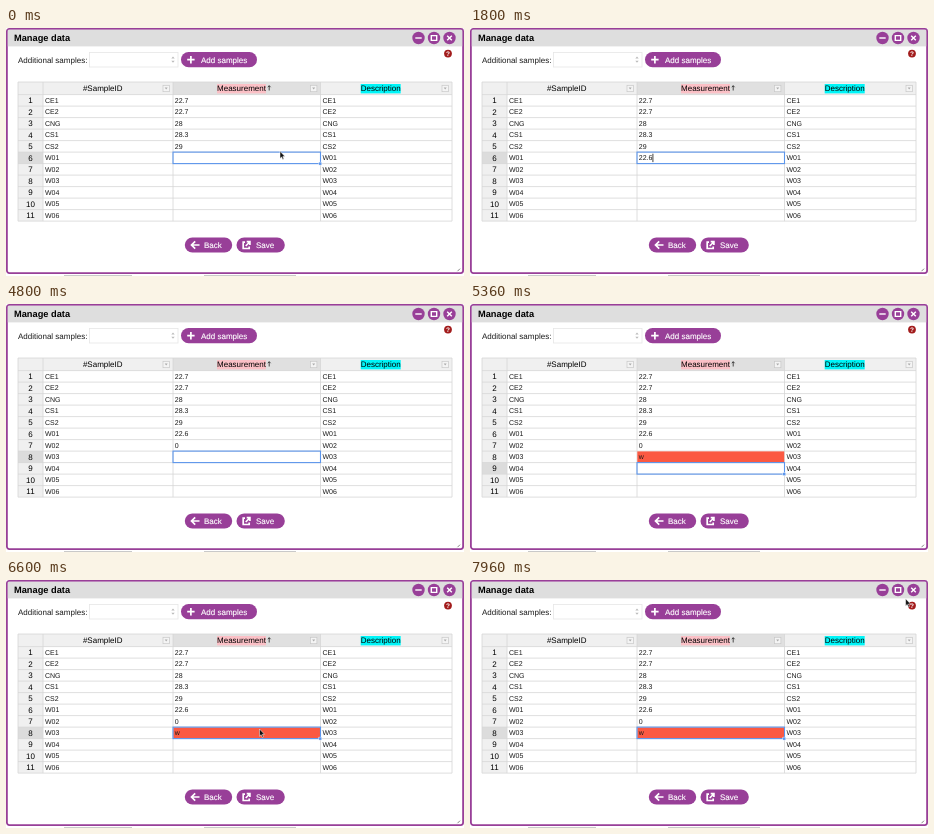
Recreate the animation shown at these times as an HTML page. Size 458x248 px, loop 8000 ms.

```html
<!DOCTYPE html>
<html lang="en">
<head>
<meta charset="utf-8">
<title>Manage data</title>
<style>
html, body { margin: 0; width: 100%; height: 100%; overflow: hidden; background: #fff; }
svg { display: block; width: 100vw; height: 100vh; font: 8px "Liberation Sans", Arial, sans-serif; text-rendering: geometricPrecision; }
</style>
</head>
<body>
<svg id="stage" viewBox="0 0 458 248"></svg>
<script>
const LOOP = 8000, BLINK = 250;
const PURPLE = '#983f98', BLUE = '#5c96ec', GRID = '#d6d6d6', HEADER = '#f0f0f0', ACTIVE = '#e0e0e0', INK = '#1a1a1a';
const COLUMNS = [12, 37, 167, 314.5, 446];
const [LEFT, NAME_X, VALUE_X, NOTE_X, RIGHT] = COLUMNS;
const HEAD_TOP = 54, FIRST_ROW = 66.6, ROW_HEIGHT = 11.5;
const SAMPLES = ['CE1', 'CE2', 'CNG', 'CS1', 'CS2', 'W01', 'W02', 'W03', 'W04', 'W05', 'W06'];
const VALUES = ['22.7', '22.7', '28', '28.3', '29'];

// keys: when each character of the text is typed; blink: when a caret cycle starts.
const EDITS = [
  { row: 6, open: 1100, close: 2030, blink: 1300, text: '22.6', keys: [1100, 1160, 1300, 1800] },
  { row: 7, open: 2660, close: 2830, blink: 2660, text: '0', keys: [2660] },
  { row: 8, open: 3300, close: 5300, blink: 3050, text: 'w', keys: [4930] }
];
const INVALID = EDITS[2], CLICK = 6265;

const POINTER_MOVES = [
  { start: 160, end: 330, from: [274, 123.3], to: [248, 131.8] },
  { start: 610, end: 665, from: [248, 131.8], to: [322, 201.5] },
  { start: 6010, end: 6240, from: [294, 224], to: [253.5, 149] },
  { start: 7150, end: 7720, from: [253.5, 149], to: [437, 6] },
  { start: 7800, end: 7950, from: [437, 6], to: [435.6, 18.7] }
];
const pointerHidden = t => t >= 700 && t < 6030;

const rowTop = row => FIRST_ROW + (row - 1) * ROW_HEIGHT;
const BOTTOM = rowTop(SAMPLES.length + 1);
const rect = (x, y, w, h, fill, extra = '') => `<rect x="${x}" y="${y}" width="${w}" height="${h}" fill="${fill}" ${extra}/>`;
const path = (d, stroke, width = 1) => `<path d="${d}" fill="none" stroke="${stroke}" stroke-width="${width}"/>`;
const text = (x, y, value, extra = '') => `<text x="${x}" y="${y}" ${extra}>${value}</text>`;
const cell = (x, row, value, extra = '') => text(x, rowTop(row) + 8.1, value, `font-size="7" fill="${INK}" ${extra}`);
const centered = 'text-anchor="middle"';

function pill(x, y, w, label, textX, icon) {
  return rect(x, y, w, 15.2, PURPLE, 'rx="7.6"') + path(icon, '#fff', 1.7) +
    text(textX, y + 10.5, label, 'fill="#fff" stroke="#fff" stroke-width=".15"');
}

function windowFrame() {
  const icons = ['M409.3 10h6.4', 'M425.3 7.6h5.4v4.8h-5.4z', 'M441.2 7.7l4.6 4.6m0-4.6l-4.6 4.6'];
  return rect(0, 0, 458, 248, '#fff') +
    path('M58 247.5H126M198 247.5H290', '#bbb', .8) +
    rect(.9, .9, 456.2, 244.2, '#fff', `rx="2.5" stroke="${PURPLE}" stroke-width="1.8"`) +
    rect(1.8, 1.8, 454.4, 16.6, '#dedede') +
    text(8, 13, 'Manage data', 'font-size="9.25" font-weight="bold"') +
    icons.map((d, i) => `<circle cx="${412.5 + i * 15.5}" cy="10" r="6.2" fill="${PURPLE}"/>` + path(d, '#fff', 1.4)).join('') +
    '<circle cx="442" cy="25.6" r="3.9" fill="#a21c1c"/>' +
    text(442, 28, '?', `font-size="6.5" font-weight="bold" fill="#fff" ${centered}`) +
    path('M451.5 243.2l2.5-2.5', '#777', .9);
}

function controls() {
  return text(12, 34.6, 'Additional samples:', `fill="${INK}"`) +
    rect(83.5, 24.5, 88.5, 14.5, '#fff', 'stroke="#e6e6e6" stroke-width=".8"') +
    '<path d="M165.3 30.6l1.7-2 1.7 2zM165.3 32.8l1.7 2 1.7-2z" fill="#bbb"/>' +
    pill(175, 24.1, 76, 'Add samples', 195, 'M181.2 31.7h7.4M184.9 28v7.4') +
    pill(178.8, 209.4, 47.4, 'Back', 198, 'M193.5 217h-8m3.7-3.6l-3.7 3.6 3.7 3.6') +
    pill(230.5, 209.4, 48.3, 'Save', 250, 'M239 214.2h-1.8v6.3h6v-2M239.7 218l4-4M240.7 213.7h3.2v3.2');
}

function tableHeader() {
  const height = FIRST_ROW - HEAD_TOP;
  const menus = [NOTE_X, VALUE_X, RIGHT].map(edge => {
    const x = edge - 6.8;
    return rect(x - 3.2, 57.3, 6.4, 6.4, '#f4f4f4', 'stroke="#c8c8c8" stroke-width=".7"') +
      `<path d="M${x - 1.5} 59.6h3l-1.5 2z" fill="#aaa"/>`;
  });
  return rect(LEFT, HEAD_TOP, RIGHT - LEFT, height, HEADER) +
    rect(LEFT, FIRST_ROW, NAME_X - LEFT, BOTTOM - FIRST_ROW, HEADER) +
    rect(VALUE_X, HEAD_TOP, NOTE_X - VALUE_X, height, ACTIVE) +
    rect(211, 56, 49, 9.4, '#fbc0c6') + rect(354.7, 56, 40, 9.4, '#00f5f8') +
    text(96.7, 63.4, '#SampleID', centered) + text(235.5, 63.4, 'Measurement', centered) +
    text(374.7, 63.4, 'Description', centered) +
    path('M263.2 62.5v-4.8m-1.4 1.5l1.4-1.5 1.4 1.5', '#222', .8) + menus.join('');
}

function gridLines() {
  const rows = SAMPLES.map((_, i) => `M${LEFT} ${rowTop(i + 1)}H${RIGHT}`);
  const columns = COLUMNS.map(x => `M${x} ${HEAD_TOP}V${BOTTOM}`);
  return path(rows.concat(columns).join('') + `M${LEFT} ${HEAD_TOP}H${RIGHT}M${LEFT} ${BOTTOM}H${RIGHT}`, GRID, .8);
}

function cellTexts() {
  return SAMPLES.map((name, i) => text(24.5, rowTop(i + 1) + 8.5, i + 1, centered) +
    cell(39, i + 1, name) + cell(316.5, i + 1, name) + cell(168.8, i + 1, VALUES[i] ?? '')).join('');
}

function selectedRow(t) {
  if (t >= CLICK) return INVALID.row;
  return EDITS[0].row + EDITS.filter(edit => t >= edit.close).length;
}

function selection(row, editing, t) {
  const y = rowTop(row), width = NOTE_X - VALUE_X;
  let out = '';
  if (t >= INVALID.close) out += rect(VALUE_X + .3, rowTop(INVALID.row) + .3, width - .6, 11, '#fb5942');
  out += rect(VALUE_X, y, width, ROW_HEIGHT, 'none', `stroke="${BLUE}" stroke-width="1.1"`);
  if (!editing) out += rect(312.8, y + 10, 3, 3, BLUE, 'stroke="#fff" stroke-width=".4"');
  for (const edit of EDITS) {
    const typed = edit.text.slice(0, edit.keys.filter(key => t >= key).length);
    out += cell(168.8, edit.row, typed, `id="value${edit.row}"`);
  }
  return out;
}

function caret(edit, t) {
  if (!edit || Math.floor(Math.max(0, t - edit.blink) / BLINK) % 2) return '';
  const value = document.getElementById('value' + edit.row);
  const width = value.textContent ? value.getComputedTextLength() : 0;
  return rect(168.9 + width, rowTop(edit.row) + 1.6, .8, 8.4, '#111');
}

function pointer(t) {
  if (pointerHidden(t)) return '';
  const { start, end, from, to } = POINTER_MOVES.findLast(move => t >= move.start) ?? POINTER_MOVES[0];
  const u = Math.min(1, Math.max(0, (t - start) / (end - start)));
  const [x, y] = from.map((v, i) => v + (to[i] - v) * u * u * (3 - 2 * u));
  return `<path transform="translate(${x} ${y})" d="M0 0V7.2L1.6 5.7 2.7 8.3 3.9 7.8 2.8 5.3H5Z" fill="#111" stroke="#fff" stroke-width=".5"/>`;
}

const stage = document.getElementById('stage');
stage.innerHTML = windowFrame() + controls() + tableHeader() +
  '<g id="rowMark"></g>' + gridLines() + cellTexts() + '<g id="live"></g><g id="overlay"></g>';
const [rowMark, live, overlay] = ['rowMark', 'live', 'overlay'].map(id => document.getElementById(id));

function draw(t) {
  const row = selectedRow(t);
  const edit = EDITS.find(({ open, close }) => t >= open && t < close);
  rowMark.innerHTML = rect(LEFT, rowTop(row), NAME_X - LEFT, ROW_HEIGHT, '#dcdcdc');
  live.innerHTML = selection(row, edit, t);
  overlay.innerHTML = caret(edit, t) + pointer(t);
}

const start = performance.now();
function tick() {
  draw((performance.now() - start) % LOOP);
  requestAnimationFrame(tick);
}
tick();
</script>
</body>
</html>
```
